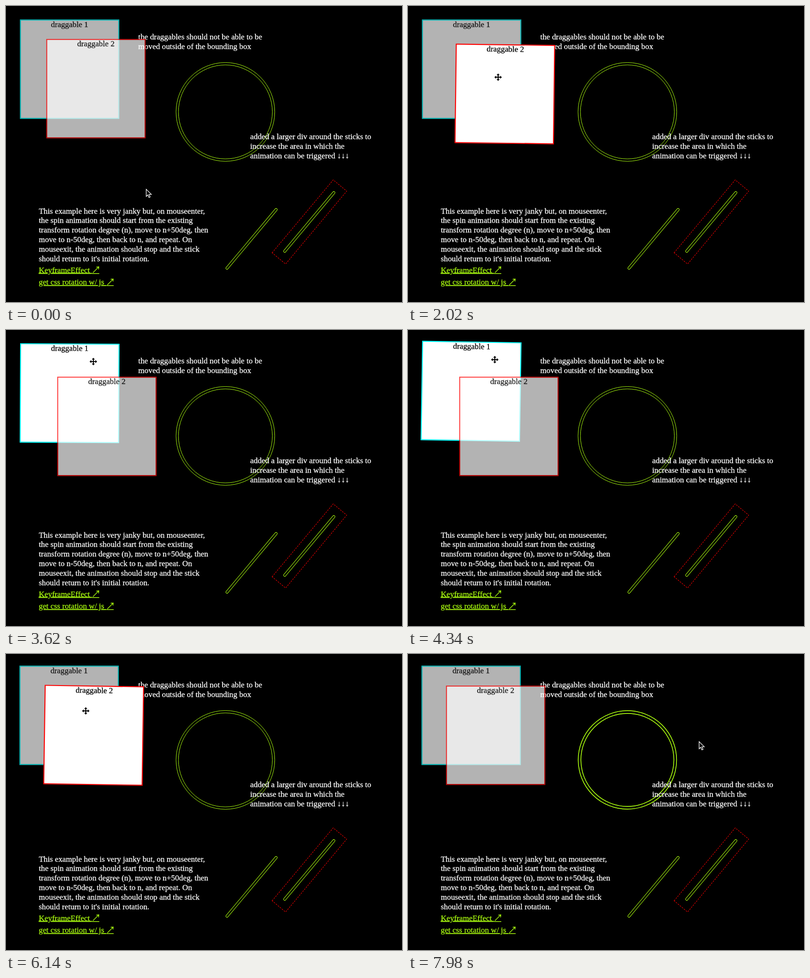
Write an HTML page that moves like this. It is 866 by 647 pixels and loops after 8000 ms.

```html
<!DOCTYPE html>
<html lang="en">
<head>
<meta charset="utf-8">
<title>Draggables</title>
<style>
  html, body { margin: 0; width: 100%; height: 100%; overflow: hidden; background: #000; }
  svg { display: block; width: 866px; height: 647px; }
  text { font: 17.4px "Liberation Serif", "Times New Roman", serif; white-space: pre;
         fill: #fff; stroke: #fff; stroke-width: .3; }
  .box rect { fill: #fff; stroke-width: 2.2; }
  .box text { fill: #000; stroke: #000; text-anchor: middle; }
  .link text { fill: #acff10; stroke: #acff10; text-decoration: underline; }
  .link path { fill: none; stroke: #acff10; stroke-width: 1.4; }
  .lime { fill: none; stroke: #acff10; stroke-width: 1; }
</style>
</head>
<body>
<svg viewBox="0 0 866 647">
  <rect width="866" height="647"/>
  <g id="rings" class="lime" transform="translate(479.8 231.5) rotate(-90)">
    <circle id="outer" pathLength="620"/>
    <circle id="inner" pathLength="590"/>
  </g>
  <g id="sticks" class="lime"></g>
  <rect x="-104" y="-19.2" width="208" height="38.4" transform="translate(663.5 472) rotate(-50)"
        fill="none" stroke="#e80000" stroke-width="1.2" stroke-dasharray="3.3 2.4"/>
  <g id="copy"></g>
  <g class="link" id="links"></g>
  <g class="box" id="box1">
    <rect x="1.1" y="1.1" width="215.2" height="215.2" stroke="#0ff"/>
    <text x="108.6" y="16.2">draggable 1</text>
  </g>
  <g class="box" id="box2">
    <rect x="1.1" y="1.1" width="215.2" height="215.2" stroke="#f00"/>
    <text x="108.6" y="16.2">draggable 2</text>
  </g>
  <path id="arrow" d="M.6.6V16.2L4.2 12.9L6.7 18.6L9.3 17.5L6.9 11.9H11.9Z"
        fill="#000" stroke="#fff" stroke-width="1.3"/>
  <path id="move" fill="#000" stroke="#fff" stroke-width="1.6" paint-order="stroke"
        d="M0-8.2L3.4-4.4H1.1V-1.1H4.4V-3.4L8.2 0L4.4 3.4V1.1H1.1V4.4H3.4L0 8.2L-3.4 4.4H-1.1V1.1H-4.4V3.4L-8.2 0L-4.4-3.4V-1.1H-1.1V-4.4H-3.4Z"/>
</svg>
<script>
const LOOP = 8000, SIZE = 217.4, HALF = SIZE / 2;
const $ = id => document.getElementById(id);

const paragraph = (x, y, step, lines) => lines.map((line, i) =>
  `<text x="${x}" y="${y + i * step}">${line}</text>`).join('');

$('copy').innerHTML =
  paragraph(289.3, 73.2, 21.2, [
    'the draggables should not be able to be',
    'moved outside of the bounding box']) +
  paragraph(534, 290.6, 21.4, [
    'added a larger div around the sticks to',
    'increase the area in which the',
    'animation can be triggered ↓↓↓']) +
  paragraph(71.7, 453.6, 20.8, [
    'This example here is very janky but, on mouseenter,',
    'the spin animation should start from the existing',
    'transform rotation degree (n), move to n+50deg, then',
    'move to n-50deg, then back to n, and repeat. On',
    'mouseexit, the animation should stop and the stick',
    "should return to it's initial rotation."]);

const link = (label, y, end) =>
  `<text x="71.7" y="${y}">${label}\u00a0</text>
   <path d="M${end - 16} ${y + 2.1}h16M${end - 14} ${y + .5}l13-13m-5.5 .6l5.5-.6l-.6 5.5"/>`;
$('links').innerHTML = link('KeyframeEffect', 582.6, 204) + link('get css rotation w/ js', 609.2, 235.5);

$('sticks').innerHTML = [[537, 509], [663.2, 472]].map(([x, y]) =>
  `<rect x="-86" y="-2.5" width="172" height="5" rx="2.5" transform="translate(${x} ${y}) rotate(-50)"/>`).join('');

const clamp = v => Math.min(1, Math.max(0, v));

// Points are [time, x, y], eased between neighbours.
function along(points, t) {
  const i = points.findIndex(p => p[0] > t);
  if (i === 0) return points[0].slice(1);
  if (i < 0) return points[points.length - 1].slice(1);
  const [t0, x0, y0] = points[i - 1], [t1, x1, y1] = points[i];
  const u = (t - t0) / (t1 - t0), e = u * u * (3 - 2 * u);
  return [x0 + (x1 - x0) * e, y0 + (y1 - y0) * e];
}

const pointer = [
  [0, 306, 400], [600, 182, 144], [1300, 182, 144], [1380, 183, 145],
  [1640, 174, 108], [1760, 174, 108], [2160, 206, 174], [2300, 206, 174],
  [2700, 191, 69], [4150, 191, 69], [4330, 189.8, 64.8], [4640, 190, 65],
  [4900, 203.4, 157.4], [5250, 203.4, 157.4], [5520, 197, 131],
  [5720, 187, 121], [6150, 174.4, 124.4], [6400, 174.4, 124.4],
  [6850, 390, 190], [7080, 393, 192], [7980, 636, 191]
];

const boxes = [
  { el: $('box1'), home: [30.4, 29.4], drags: [[3040, 4540]] },
  { el: $('box2'), home: [88, 72], drags: [[680, 2220], [5220, 6200]] }
];

function pose(box, t) {
  let [x, y] = box.home, angle = 0;
  for (const [down, up] of box.drags) {
    if (t < down) break;
    const from = along(pointer, down), to = along(pointer, Math.min(t, up));
    x += to[0] - from[0];
    y += to[1] - from[1];
    if (t < up) angle = Math.sin((t - down) / 400 * 2 * Math.PI) * .9;
  }
  return { x, y, angle };
}

function draw(t) {
  const [px, py] = along(pointer, t);
  const poses = boxes.map(box => pose(box, t));
  const inside = poses.map(({ x, y }) => px > x && px < x + SIZE && py > y && py < y + SIZE);
  const over = inside.lastIndexOf(true);

  boxes.forEach(({ el }, i) => {
    const { x, y, angle } = poses[i];
    const [panel, label] = el.children;
    el.setAttribute('transform', `translate(${x} ${y}) rotate(${angle} ${HALF} ${HALF})`);
    panel.setAttribute('opacity', i === over ? 1 : .7);
    label.setAttribute('opacity', i === over ? 1 : .88);
  });

  const dashed = t > 6400 && Math.hypot(px - 479.8, py - 231.5) < HALF;
  const width = 1 + clamp((t - 6780) / 300) - clamp((t - 7680) / 900);
  $('rings').style.strokeWidth = width;
  $('rings').setAttribute('stroke-dasharray', dashed ? '6 4' : 'none');
  $('outer').setAttribute('r', 108.4 - width / 2);
  $('inner').setAttribute('r', 104.2 - width * 1.5);

  const at = `translate(${px} ${py})`;
  $('arrow').setAttribute('transform', at);
  $('move').setAttribute('transform', at);
  $('arrow').style.display = over < 0 ? '' : 'none';
  $('move').style.display = over < 0 ? 'none' : '';
}

const start = performance.now();
function tick() {
  draw((performance.now() - start) % LOOP);
  requestAnimationFrame(tick);
}
tick();
</script>
</body>
</html>
```
